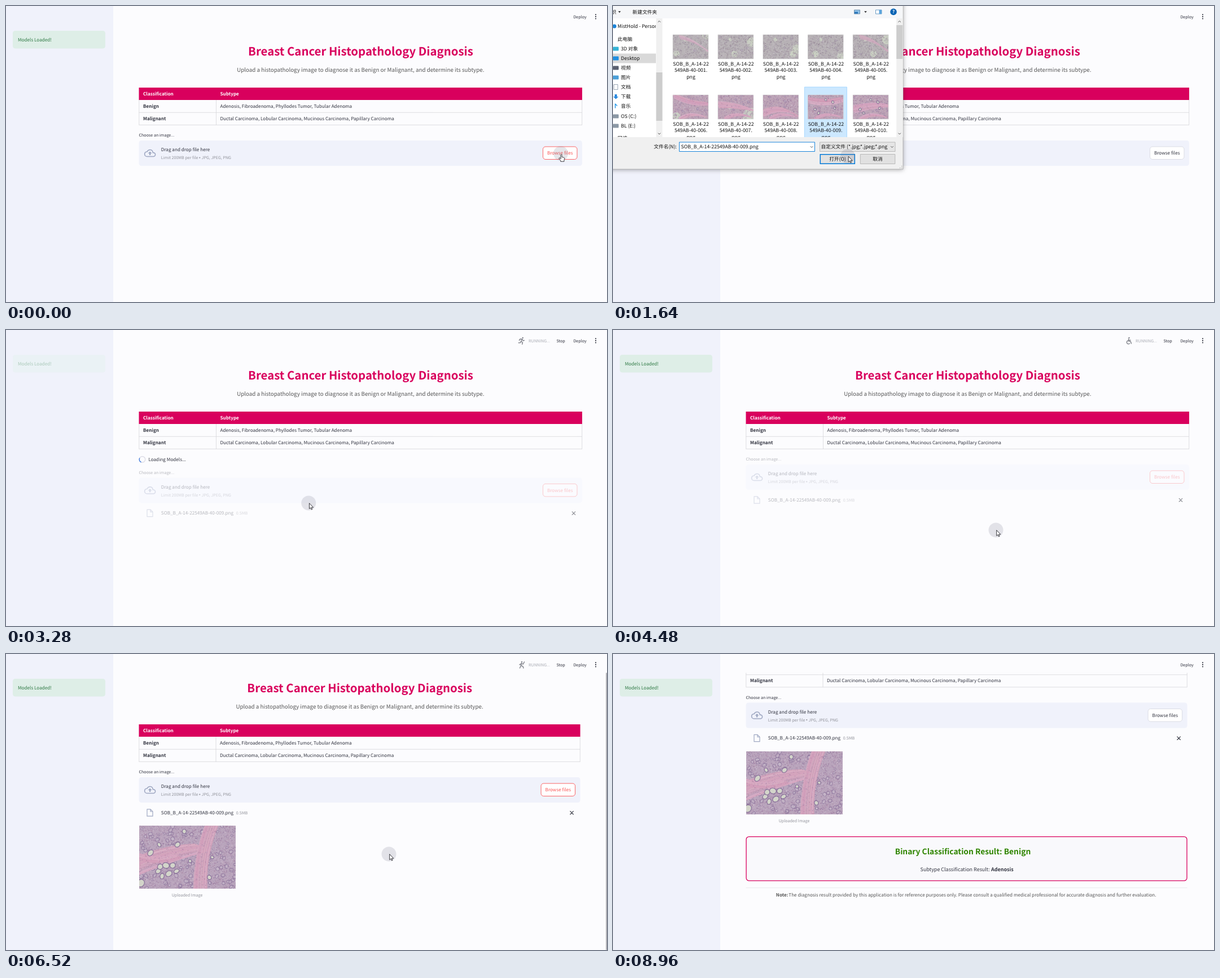
Write an HTML page with a canvas that moves like this. It is 1065 px wide and 526 px high and loops after 9040 ms.

```html
<!DOCTYPE html>
<html lang="zh-CN">
<head>
<meta charset="utf-8">
<title>Histopathology diagnosis demo</title>
<style>
html, body { margin: 0; width: 100%; height: 100%; overflow: hidden; background: #fcfcfe; }
canvas { display: block; width: 1065px; height: 526px; }
</style>
</head>
<body>
<canvas id="stage"></canvas>
<script>
const W = 1065, H = 526, LOOP = 9040;
const EM = 0.5098; // CSS pixels of the page to stage pixels
const FONT = '"Noto Sans CJK SC", "Noto Sans CJK JP", "Noto Sans", sans-serif';
const PAGE = '#fcfcfe', INK = '#31333f', MUTED = '#92939b', PINK = '#d9005d', RED = '#fa5555';
const DIALOG_TEXT = 17.1;

const canvas = document.getElementById('stage');
const dpr = window.devicePixelRatio || 1;
canvas.width = W * dpr;
canvas.height = H * dpr;
const ctx = canvas.getContext('2d');

const clamp = v => Math.max(0, Math.min(1, v));
const mix = (a, b, k) => a + (b - a) * k;
const smooth = k => k * k * (3 - 2 * k);
const linear = k => k;

// Interpolates rows of [time, ...values].
function track(rows, t, ease = linear) {
  let i = 0;
  while (i < rows.length - 2 && t >= rows[i + 1][0]) i++;
  const [a, b] = [rows[i], rows[i + 1]];
  const k = ease(clamp((t - a[0]) / (b[0] - a[0])));
  return a.slice(1).map((v, j) => mix(v, b[j + 1], k));
}

const CURSOR = [[0, 983, 262], [760, 983, 262], [1240, 378, 180], [1400, 378, 180], [1640, 416, 267],
  [2960, 416, 267], [3640, 678.5, 355.5], [8320, 678.5, 355.5], [8600, 770, -30]];
const SCROLL = [[0, 0], [5720, 0], [5880, 20], [8040, 20], [8080, 40], [8120, 69.5], [8200, 122], [8300, 152.5], [9040, 152.5]];

function text(s, x, cy, size = 16, color = INK, weight = 400, align = 'left') {
  const px = size * EM;
  ctx.font = `${weight} ${px}px ${FONT}`;
  ctx.textRendering = 'geometricPrecision';
  ctx.textAlign = align;
  ctx.fillStyle = color;
  ctx.fillText(s, x, cy + px * 0.3665);
}

function box(x, y, w, h, fill, stroke, line = 1, r = 0) {
  ctx.beginPath();
  ctx.roundRect(x, y, w, h, r);
  if (fill) { ctx.fillStyle = fill; ctx.fill(); }
  if (stroke) { ctx.strokeStyle = stroke; ctx.lineWidth = line; ctx.stroke(); }
}

function disc(x, y, r, color, g = ctx) {
  g.beginPath();
  g.arc(x, y, r, 0, 7);
  g.fillStyle = color;
  g.fill();
}

function shape(d, x, y, scale, { fill, stroke, line = 1 }) {
  const path = new Path2D(d);
  ctx.save();
  ctx.translate(x, y);
  ctx.scale(scale, scale);
  ctx.lineJoin = ctx.lineCap = 'round';
  if (fill) { ctx.fillStyle = fill; ctx.fill(path); }
  if (stroke) { ctx.strokeStyle = stroke; ctx.lineWidth = line / scale; ctx.stroke(path); }
  ctx.restore();
}

// --- stained tissue pictures ---
function tissue(w, h, seed, { base, sat = 18, cell = 3.5, rings = 1, bands = [], pale = [], lumens = [] }) {
  const c = document.createElement('canvas');
  c.width = w * 2;
  c.height = h * 2;
  const g = c.getContext('2d');
  g.scale(2, 2);
  const rnd = () => (seed = (seed * 16807) % 2147483647) / 2147483647;
  g.fillStyle = base;
  g.fillRect(0, 0, w, h);
  const specks = (n, alpha) => {
    for (let i = 0; i < n; i++)
      disc(rnd() * w, rnd() * h, 0.4 + rnd() * 0.8, `hsla(${275 + rnd() * 40},${sat}%,${46 + rnd() * 38}%,${alpha})`, g);
  };
  const ring = (x, y, r, fill, alpha) => {
    g.beginPath();
    g.ellipse(x, y, r, r * (0.65 + rnd() * 0.3), rnd() * 3, 0, 7);
    g.fillStyle = fill;
    g.fill();
    g.strokeStyle = `hsla(275,${sat}%,50%,${alpha})`;
    g.lineWidth = Math.min(1.4, r * 0.5);
    g.stroke();
  };
  for (const [x, y, r] of pale) disc(x * w, y * h, r * w, '#cbd2c4', g);
  specks(w * h / 4, 0.4);
  for (let i = 0; i < w * h / 130 * rings; i++)
    ring(rnd() * w, rnd() * h, cell * (0.4 + rnd() * 0.6), `hsla(290,14%,${74 + rnd() * 8}%,.55)`, 0.55);
  g.lineCap = 'round';
  for (const [x0, y0, x1, y1, x2, y2, width] of bands) {
    for (let i = 0; i < width * 4; i++) {
      const off = (rnd() - 0.5) * width;
      g.beginPath();
      g.moveTo(x0 * w + off * 0.5, y0 * h + off);
      g.quadraticCurveTo(x1 * w + off * 0.7, y1 * h + off, x2 * w + off, y2 * h + off * 0.4);
      g.strokeStyle = `hsla(${322 + rnd() * 14},${sat + 18}%,${68 + rnd() * 12}%,.4)`;
      g.lineWidth = 0.6 + rnd() * 1.6;
      g.stroke();
    }
  }
  specks(w * h / 16, 0.3);
  for (const [x, y, r] of lumens) ring(x * w, y * h, r, '#d3d5ca', 0.8);
  return c;
}

const sample = tissue(171, 112, 4711, {
  base: '#b9a5bc', cell: 4,
  bands: [[-.05, .66, .3, .42, .66, .34, 28], [.78, -.1, .62, .45, .64, 1.1, 26], [-.05, .45, .15, .6, .4, .48, 14]],
  lumens: [[.12, .43, 6], [.21, .3, 4], [.2, .72, 5], [.22, .65, 5], [.28, .63, 6], [.35, .63, 5], [.39, .72, 5],
    [.31, .76, 6], [.24, .8, 5], [.02, .91, 7], [.47, .09, 4], [.4, .3, 5], [.53, .56, 3], [.73, .82, 4], [.76, .5, 3]]
});

const thumbs = Array.from({ length: 10 }, (_, i) => tissue(63, 43, 97 + i * 131, i < 5 ? {
  base: '#b8b3b6', sat: 8, cell: 1.8, rings: 0.7,
  pale: [[(i * .37 + .1) % 1, .8, .09], [.95, (i * .3) % 1, .13], [.35, .2, .05]],
  bands: i === 0 || i === 4 ? [[.2, .1, .6, .2, 1, .7, 8]] : []
} : {
  base: '#bea5b6', sat: 18, cell: 2, rings: 0.8,
  pale: i === 6 ? [[.95, .9, .25], [.35, .45, .1]] : i === 5 ? [[.1, .9, .12]] : [],
  bands: [[0, (i * .4) % 1, .5, .4, 1, (i * .27) % 1, 12], [.2, 1, .5, .7, .9, .9, 6]],
  lumens: i > 7 ? [[.2, .6, 2.5], [.3, .75, 2.5], [.7, .3, 2.5], [.75, .55, 2.5], [.5, .2, 2]] : []
}));

// --- page parts ---
const CLOUD = 'M19 11h-.9l-.3-1.2C17.3 6.8 14.9 5 12 5 9.6 5 7.4 6.4 6.3 8.6L6 9l-.6.1C2.8 9.4 1 11.5 1 14a5 5 0 0 0 5 5h13a4 4 0 0 0 0-8z';
const CLOUD_ARROW = 'M12 8.5l4 4.2h-2.6V16h-2.8v-3.3H8z';
const SHEET = 'M-5-6.2h6L5-2.2V6.2H-5zM1-6v4h4';
const CROSS = 'M-2.8-2.8L2.8 2.8M2.8-2.8L-2.8 2.8';

function browseButton(right, cy, focused) {
  box(right - 69.5, cy - 11.2, 60.5, 22.5, '#fff', focused ? RED : '#d9dae1', 0.9, 4.5);
  text('Browse files', right - 39.3, cy, 16, focused ? RED : INK, 400, 'center');
}

function table(right) {
  const split = right > 1019 ? 372.5 : 372, x = split + 7;
  box(235.5, 145, right - 235.5, 22, PINK);
  text('Classification', 243, 156, 16, '#fff', 700);
  text('Subtype', x, 156, 16, '#fff', 700);
  text('Benign', 243, 178, 16, INK, 700);
  text('Adenosis, Fibroadenoma, Phyllodes Tumor, Tubular Adenoma', x, 178);
  text('Malignant', 243, 200, 16, INK, 700);
  text('Ductal Carcinoma, Lobular Carcinoma, Mucinous Carcinoma, Papillary Carcinoma', x, 200);
  ctx.strokeStyle = '#d6d6da';
  ctx.lineWidth = 0.8;
  ctx.beginPath();
  for (const y of [189.3, 211.4]) { ctx.moveTo(235.5, y); ctx.lineTo(right, y); }
  for (const gx of [235.8, split, right - .3]) { ctx.moveTo(gx, 167); ctx.lineTo(gx, 211.4); }
  ctx.stroke();
}

function uploader(right, focused, hasFile, opacity) {
  ctx.globalAlpha = opacity;
  text('Choose an image...', 235.5, 229.8, 14);
  box(235.5, 239, right - 235.5, 45, '#f0f2fb', null, 1, 4.5);
  shape(CLOUD, 244.8, 251.2, 0.86, { stroke: '#9fa8c2', line: 1.6 });
  shape(CLOUD_ARROW, 244.8, 251.2, 0.86, { fill: '#9fa8c2' });
  text('Drag and drop file here', 274.8, 255.4);
  text('Limit 200MB per file', 274.8, 269.6, 14, MUTED);
  disc(343.3, 269.6, 1.1, MUTED);
  text('JPG, JPEG, PNG', 346.6, 269.6, 14, MUTED);
  browseButton(right, 261.2, focused);
  if (hasFile) {
    shape(SHEET, 255, 302, 1, { stroke: '#9fa8c2', line: 1.2 });
    text('SOB_B_A-14-22549AB-40-009.png', 274.8, 301.8);
    text('0.5MB', 407.8, 302, 14, MUTED);
    ctx.globalAlpha = Math.sqrt(opacity);
    shape(CROSS, right - 15, 302.2, 1, { stroke: INK, line: 1.1 });
  }
  ctx.globalAlpha = 1;
}

function spinner(t) {
  const a = t / 500 * Math.PI * 2 - 1.6;
  ctx.lineWidth = 1.4;
  ctx.strokeStyle = '#dcdce6';
  ctx.beginPath();
  ctx.arc(241.5, 230, 5.3, 0, 7);
  ctx.stroke();
  ctx.strokeStyle = '#3f7be0';
  ctx.beginPath();
  ctx.arc(241.5, 230, 5.3, a, a + 1.7);
  ctx.stroke();
  text('Loading Models...', 252.4, 230);
}

function result(right) {
  box(236.1, 477.1, right - 236.7, 78.3, '#f9f9fc', PINK, 1.3, 5);
  text('Binary Classification Result: Benign', 620, 503, 27.1, '#2f8500', 700, 'center');
  text('Subtype Classification Result:', 544.6, 535.7, 17.6);
  text('Adenosis', 670, 535.7, 17.6, INK, 700);
  box(235.5, 567.4, right - 235.5, 0.7, '#dcdce1');
  text('Note:', 288.8, 581, 16, '#555', 700);
  text('The diagnosis result provided by this application is for reference purposes only. ' +
    'Please consult a qualified medical professional for accurate diagnosis and further evaluation.', 311.3, 581, 16, '#555');
}

// Little athletes, drawn as limbs around a head at [x, y].
const POSES = [
  [1.5, -5, 'M0-2.5L-1 1.5L2 3.5V6M-1 1.5L-4.5 4.5M0-2.5L4 0M0-2.5L-4-1'],
  [1, -5, 'M0-3L.5 1H3.5L5 5M0-1H3.5M-1 0a3 3 0 1 0 3 5'],
  [2.2, -5, 'M1-2.8L-.8 1L2 3L1.2 6.2M-.8 1L-2 3.6L-5.2 3.8M1-2.8L-2.4-3L-4-.8M1-2.8L3 0L5-.6'],
  [.5, -4.8, 'M0-2.5L-1 1.5L2.5 3L3.5 6M-1 1.5L-3 6M0-2L3-1L5-5M0-2L-3.5 0'],
  [3, -3, 'M1.5-1.5L-3 1L-5.5 4M-3 1L0 3.5L-2 6M1.5-1.5L4 1L5.5 1']
];

function header(t) {
  box(190, 0, W - 190, 33.5, PAGE);
  if (t >= 2120 && t < 7880) {
    const [x, y, limbs] = POSES[Math.floor((t - 2120) / 90) % POSES.length];
    disc(913.5 + x, 19 + y, 1.3, '#85878f');
    shape(limbs, 913.5, 19, 1, { stroke: '#85878f', line: 1.5 });
    text('RUNNING...', 926, 19, 14, '#a9abb3');
    text('Stop', 975.4, 19, 14);
  }
  text('Deploy', 1005.4, 19, 14);
  for (const y of [15.3, 18.9, 22.5]) disc(1045, y, 1.1, INK);
}

function page(t) {
  const [scroll] = track(SCROLL, t);
  const uploaded = t >= 4600, finished = t >= 7680;
  const right = uploaded ? 1017.6 : 1021, mid = (235.5 + right) / 2;
  const stale = mix(1, 0.33, clamp((t - 2040) / 520));
  const loading = t >= 2160 && t < 4440;

  box(0, 0, W, H, PAGE);
  box(0, 0, 190, H, '#f0f2fb');
  ctx.globalAlpha = t < 4440 ? stale : 1;
  box(12, 44, 164, 31.5, '#deeee7', null, 1, 4.5);
  text('Models Loaded!', 21, 60.2, 16, '#2f7a45');
  ctx.globalAlpha = 1;

  ctx.save();
  ctx.translate(0, -scroll);
  text('Breast Cancer Histopathology Diagnosis', mid + .2, 81, 40, PINK, 700, 'center');
  text('Upload a histopathology image to diagnose it as Benign or Malignant, and determine its subtype.',
    mid, 113.5, 19.2, '#555', 400, 'center');
  table(right);
  if (loading) spinner(t);
  ctx.save();
  if (loading) ctx.translate(0, 23.4);
  uploader(right, t < 800 || (t >= 1800 && t < 8960), t >= 2000, uploaded ? 1 : stale);
  ctx.restore();
  if (uploaded) {
    ctx.drawImage(sample, 235.5, 325.2, 171, 112);
    text('Uploaded Image', 321, 448.7, 14, MUTED, 400, 'center');
  }
  if (finished) result(right);
  ctx.restore();

  if (uploaded && t < 8560) {
    const full = finished ? 678.5 : 546;
    box(1063, scroll * H / full, 2, H * H / full, '#b3b3b8', null, 1, 1);
  }
  header(t);
}

// --- file dialog ---
const FOLDERS = [['此电脑', 59, 8, '#3aa0dc'], ['3D 对象', 76, 14, '#36b3d6'], ['Desktop', 93, 14, '#1f8fe0'],
  ['视频', 110, 14, '#5a6070'], ['图片', 127, 14, '#4a9fd8'], ['文档', 144, 14, '#9aa7b5'], ['下载', 161, 14, '#2b8ae0'],
  ['音乐', 178, 14, '#2196e8'], ['OS (C:)', 196, 14, '#8b98a5'], ['BL (E:)', 213, 14, '#8b98a5'], ['网络', 235, 8, '#3aa0dc']];

const label = (s, x, y, align) => text(s, x, y, DIALOG_TEXT, '#111', 400, align);
const chevron = (x, y, up) => shape(up ? 'M-2 1L0-1L2 1' : 'M-2-1L0 1L2-1', x, y, 1, { stroke: '#555', line: 1 });

function scrollbar(x, top, size) {
  box(x, 22, 11, 211, '#f0f0f0');
  box(x, top, 11, size, '#cdcdcd');
  chevron(x + 5.5, 27.5, true);
  chevron(x + 5.5, 227, false);
}

function clipped(x, y, w, h, draw) {
  ctx.save();
  ctx.beginPath();
  ctx.rect(x, y, w, h);
  ctx.clip();
  draw();
  ctx.restore();
}

function tree() {
  box(0, 84.5, 76, 17, '#d9d9d9');
  disc(2.5, 36, 3.5, '#1b84d8');
  label('MistHold - Personal', 8, 36);
  for (const [name, y, x, color] of FOLDERS) {
    if (name === '音乐') shape('M4-4v7M4-4l3 3', 0, y, 1, { stroke: color, line: 1.4 });
    else if (name === '下载') shape('M3-4h4v4h2.5L5 4.5L.5 0H3z', 0, y, 1, { fill: color });
    else if (name === '文档') box(1.5, y - 4.5, 7, 9, '#fff', color);
    else box(x - 14, y - 3.5, x > 8 ? 10 : 5, 7, color, null, 1, 1);
    label(name, x, y);
  }
}

function files(picked) {
  for (let i = 0; i < 10; i++) {
    const x = 106 + (i % 5) * 79.8, y = i < 5 ? 51 : 158;
    if (picked && i === 8) box(x - 6, y - 14, 75, 100, '#cce8ff', '#99d1ff', 0.8);
    ctx.drawImage(thumbs[i], x, y, 63, 43);
    box(x, y, 63, 43, null, '#d0d0d0', 0.6);
    const lines = ['SOB_B_A-14-22', `549AB-40-${String(i + 1).padStart(3, '0')}.`, 'png'];
    lines.forEach((s, j) => label(s, x + 32, y + 51.5 + j * 11.7, 'center'));
  }
}

function dialog(t) {
  const picked = t >= 1240;
  ctx.save();
  ctx.shadowColor = 'rgba(0,0,0,.35)';
  ctx.shadowBlur = 8 * dpr;
  ctx.shadowOffsetY = dpr;
  box(-20, -20, 534, 310, '#f0f0f0');
  ctx.restore();
  box(-20, -20, 534, 310, null, '#a5a5a5', 0.8);
  box(0, 0, 513.5, 22, '#f6f7f9');
  box(0, 22, 513.5, 211, '#fff');

  label('组织', 6, 10.5, 'right');
  shape('M-2.3-1.2h4.6L0 1.4z', 11.5, 10.5, 1, { fill: '#222' });
  label('新建文件夹', 34.5, 10.5);
  box(427.5, 7, 10, 7, '#8fc1e8', '#5d7f9e', 0.8);
  box(428, 10.5, 6, 3, '#2673b8');
  shape('M-2.3-1.2h4.6L0 1.4z', 447.5, 10.5, 1, { fill: '#222' });
  box(465.5, 7, 10.5, 7, '#fff', '#4a86b8', 0.8);
  box(471.5, 7, 4.5, 7, '#5ba4dc');
  disc(497, 10.4, 5.8, '#0a64b4');
  text('?', 497, 10.4, 16, '#fff', 700, 'center');

  clipped(0, 22, 76, 211, tree);
  clipped(89, 22, 413, 211, () => files(picked));
  scrollbar(76.5, 118, 86);
  scrollbar(502.2, 34, 60);

  label('文件名(N):', 113, 250.3, 'right');
  box(117.5, 242, 240, 16.5, '#fff', '#0078d7', 0.9);
  if (picked) label('SOB_B_A-14-22549AB-40-009.png', 120.5, 250.3);
  else box(119.7, 244.5, 0.8, 11.5, '#111');
  chevron(352, 250.5);
  box(366.5, 242, 133.5, 16.5, '#e5e5e5', '#adadad', 0.8);
  clipped(367, 242, 120, 17, () => label('自定义文件 (*.jpg;*.jpeg;*.png)', 368.5, 250.3));
  chevron(494.5, 250.5);
  box(367.3, 263.8, 61, 16.4, '#e1e1e1', '#0078d7', 1.5);
  label('打开(O)', 398, 272, 'center');
  box(438.3, 263.5, 61.5, 17, '#e1e1e1', '#adadad', 0.8);
  label('取消', 469, 272, 'center');
  for (const [x, y] of [[511, 287], [508, 287], [511, 284]]) box(x, y, 1.2, 1.2, '#aaa');
}

// --- pointer ---
const ARROW = 'M0 0v9.6l2.2-2 1.6 3.5 1.5-.7-1.6-3.3h3z';
const HAND = 'M-1 1Q0-.8 1 1V5L4.6 6Q6 6.4 5.7 8L5 10.5V13H-1.2V11.5L-4 7.8Q-4.4 6.4-3 6.4L-1 8z';

function pointer(t) {
  const [x, y] = track(CURSOR, t, smooth);
  const busy = t >= 120 && t < 280;
  const hand = !busy && (t < 840 || (t >= 1800 && t < 3120));
  disc(x, y, 13, 'rgba(110,110,135,.18)');
  shape(hand ? HAND : ARROW, x + (hand ? 1 : 1.2), y + (hand ? 1.3 : .6), 1, { fill: '#fff', stroke: '#26262c', line: 0.9 });
  if (busy) {
    ctx.strokeStyle = '#2f8fe0';
    ctx.lineWidth = 1.4;
    ctx.beginPath();
    ctx.arc(x + 9.5, y + 3, 3, 0, 7);
    ctx.stroke();
  }
}

function render(now) {
  const t = now % LOOP;
  ctx.setTransform(dpr, 0, 0, dpr, 0, 0);
  page(t);
  if (t >= 480 && t < 1800) dialog(t);
  pointer(t);
}

const start = performance.now();
(function tick() {
  render(performance.now() - start);
  requestAnimationFrame(tick);
})();
</script>
</body>
</html>
```
